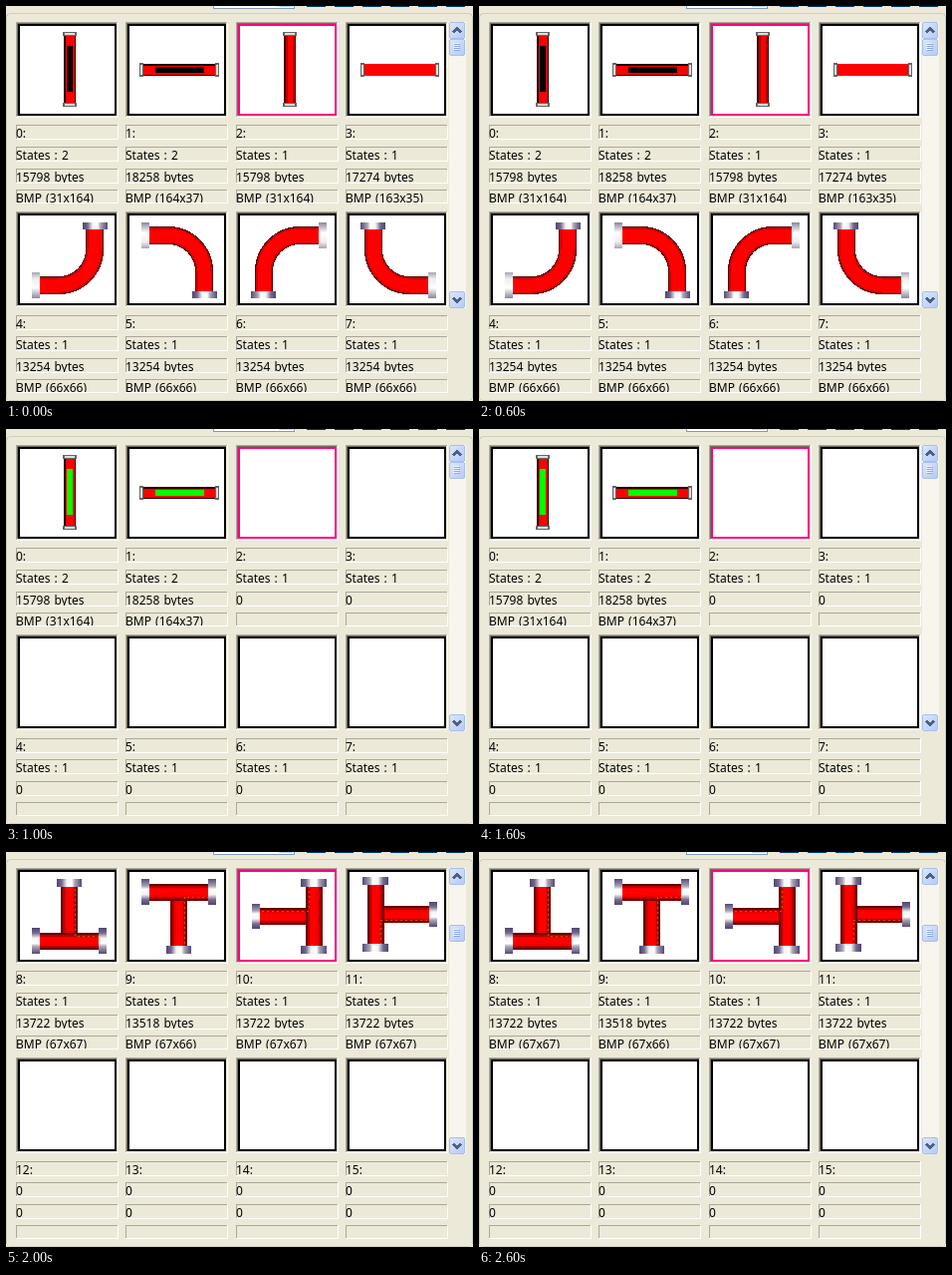
An HTML page for the animation above (3 s loop, 469 by 396 pixels).

```html
<!DOCTYPE html>
<html lang="en">
<head>
<meta charset="utf-8">
<title>Pipe image browser</title>
<style>
html, body { margin: 0; overflow: hidden; background: #ece9d8; }
svg { display: block; shape-rendering: crispEdges; }
text { font: 12px "Noto Sans", sans-serif; word-spacing: 1px; fill: #000; }
</style>
</head>
<body>
<svg id="stage" width="469" height="396">
  <defs>
    <linearGradient id="metal">
      <stop offset="0" stop-color="#51456f"/><stop offset=".2" stop-color="#76698f"/>
      <stop offset=".4" stop-color="#f4f4f4"/><stop offset=".6" stop-color="#fff"/>
      <stop offset=".72" stop-color="#aaa5b5"/><stop offset="1" stop-color="#564974"/>
    </linearGradient>
    <linearGradient id="metalDown" href="#metal" gradientTransform="rotate(90)"/>
    <linearGradient id="silver" x2="0" y2="1">
      <stop stop-color="#aaa5b5"/><stop offset=".25" stop-color="#eee"/>
      <stop offset=".6" stop-color="#fff"/><stop offset="1" stop-color="#8c869c"/>
    </linearGradient>
    <linearGradient id="button" x2="1" y2="1">
      <stop stop-color="#dce7ff"/><stop offset="1" stop-color="#b5c9f7"/>
    </linearGradient>
  </defs>
</svg>
<script>
const COLUMNS = [10, 120, 231, 341];

const rect = (x, y, w, h, fill, extra = '') =>
  `<rect x="${x}" y="${y}" width="${w}" height="${h}" fill="${fill}" ${extra}/>`;
const stroke = (d, color, width, extra = '') =>
  `<path d="${d}" fill="none" stroke="${color}" stroke-width="${width}" ${extra}/>`;
const place = (transform, content) => `<g transform="${transform}">${content}</g>`;

// Nested strokes shade a pipe from its dark rim to the bright middle.
const tube = (d, shades) => shades.map(([color, width]) => stroke(d, color, width)).join('');
const flange = (x, y, w, h, metal = w > h ? 'metal' : 'metalDown') => rect(x, y, w, h, `url(#${metal})`);

const straight = (shades, core) => {
  const cap = y => rect(-7, y, 14, 4, '#666') + rect(-5, y + 1, 10, 2, '#ddd');
  return tube('M0 2V72', shades) + cap(0) + cap(71) +
    (core ? rect(-3, 14, 6, 46, core) : '');
};
const edged = [['#200', 12], ['#f00', 9]];
const rounded = [['#400', 12], ['#b00', 9], ['#f00', 5]];
const flat = [['#f00', 12]];

const elbow = tube('M63 6V27A36 36 0 0 1 27 63H7', [['#500', 18], ['#c00', 16], ['#f00', 13]]) +
  flange(51, 0, 25, 7) + flange(0, 50, 8, 26, 'silver');

const teeShades = [['#600', 17], ['#b00', 13], ['#e00', 9], ['#f00', 6]];
const tee = tube('M37.5 7V62', teeShades) + tube('M8 62H68', teeShades) +
  stroke('M43 10V57H68', '#b06000', 1, 'stroke-dasharray="2 3"') +
  flange(25, 0, 25, 8) + flange(0, 49, 8, 26) + flange(67, 49, 8, 26);

const coredPipes = core =>
  place('translate(64 26)', straight(edged, core)) +
  place('translate(214 64) rotate(90) scale(1 1.07)', straight(edged, core));

const pipes = coredPipes('#000') +
  place('translate(285 26)', straight(rounded)) +
  place('translate(435 64) rotate(90) scale(1 1.06)', straight(flat)) +
  place('translate(26 217)', elbow) +
  place('translate(136 293) scale(1 -1)', elbow) +
  place('translate(322 293) scale(-1)', elbow) +
  place('translate(432 217) scale(-1 1)', elbow);

const tees = place('translate(26 27)', tee) +
  place('translate(136 102) scale(1 -1)', tee) +
  place('translate(247 102) rotate(-90)', tee) +
  place('translate(433 25) rotate(90)', tee);

const info = (size, dims, states = 1) => ['States : ' + states, size + ' bytes', `BMP (${dims})`];
const pending = ['States : 1', '0', ''];
const unused = ['0', '0', ''];
const cored = [info(15798, '31x164', 2), info(18258, '164x37', 2)];
const bend = info(13254, '66x66');
const junction = info(13722, '67x67');

const pages = [
  { first: 0, thumb: 33, art: pipes,
    cells: [...cored, info(15798, '31x164'), info(17274, '163x35'), bend, bend, bend, bend] },
  { first: 0, thumb: 33, art: coredPipes('#0f0'),
    cells: [...cored, ...Array(6).fill(pending)] },
  { first: 8, thumb: 73, art: tees,
    cells: [junction, info(13518, '67x66'), junction, junction, ...Array(4).fill(unused)] },
];

const row = i => Math.floor(i / 4);
const labelTop = (i, n) => Math.round(119.3 + 21.6 * n + 190.3 * row(i));
const labelHeight = n => n < 3 ? 15 : 14;

function emptyCell(i) {
  const x = COLUMNS[i % 4], y = 16 + 190 * row(i);
  const labels = [0, 1, 2, 3].map(n => {
    const top = labelTop(i, n), h = labelHeight(n);
    return rect(x, top, 103, h, '#fff') + rect(x, top, 102, h - 1, '#aca899') +
      rect(x + 1, top + 1, 101, h - 2, '#ece9d8');
  });
  return rect(x, y, 103, 96, '#fff') + rect(x, y, 102, 95, '#aca899') +
    rect(x + 1, y + 1, 101, 94, '#f1efe2') + rect(x + 1, y + 1, 100, 93, '#716f64') +
    rect(x + 2, y + 2, 99, 92, i === 2 ? '#ff0080' : '#000') +
    rect(x + 4, y + 4, 95, 88, '#fff') + labels.join('');
}

const cellText = (lines, i, first) => [first + i + ':', ...lines].map((line, n) =>
  `<svg x="${COLUMNS[i % 4]}" y="${labelTop(i, n)}" width="102" height="${labelHeight(n) - 1}">
    <text y="13">${line}</text></svg>`).join('');

const scrollButton = y => rect(445.5, y + .5, 15, 16, 'url(#button)', 'rx="2" stroke="#a9bfec"');
const thumb = y => scrollButton(y) +
  [5, 7, 9, 11].map(dy => rect(450, y + dy, 6, 1, '#8ca7e5') + rect(449, y + dy - 1, 6, 1, '#eef4ff')).join('');

const chrome = rect(.5, 7.5, 468, 388, 'none', 'rx="4" stroke="#d0d0bf"') +
  rect(208, 0, 82, 3, '#7f9db9') + rect(209, 0, 80, 2, '#fff') + rect(274, 0, 14, 1, '#c1d2f9') +
  [301, 329, 357, 385, 413, 441].map(x => rect(x, -6, 21, 7, '#003c74', 'rx="2"')).join('') +
  rect(445, 16, 17, 287, '#f7f5ee') +
  scrollButton(16) + scrollButton(286) +
  stroke('M449 26.5l4-4l4 4', '#4d6185', 2.4) + stroke('M449 292.5l4 4l4-4', '#4d6185', 2.4) +
  pages[0].cells.map((_, i) => emptyCell(i)).join('');

const stage = document.getElementById('stage');
stage.innerHTML += chrome + pages.map(({ first, thumb: y, art, cells }) =>
  `<g class="page">${art}${thumb(y)}${cells.map((c, i) => cellText(c, i, first)).join('')}</g>`).join('');
const groups = stage.querySelectorAll('.page');

function draw() {
  const current = Math.floor(performance.now() % 3000 / 1000);
  groups.forEach((g, i) => g.style.display = i === current ? '' : 'none');
  requestAnimationFrame(draw);
}
draw();
</script>
</body>
</html>
```
